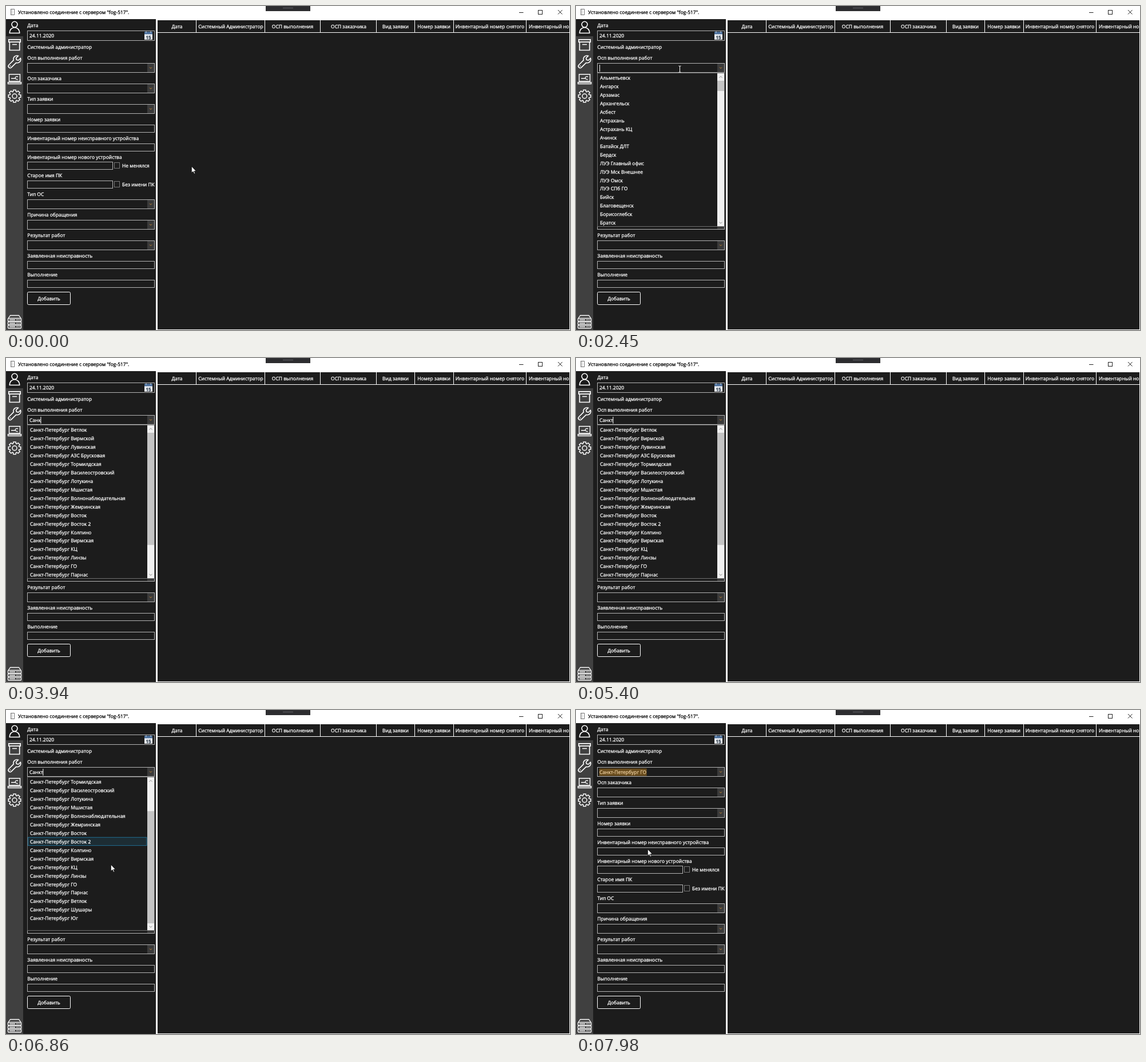
Write an HTML page that moves like this. It is 986x568 px and loops after 8000 ms.

```html
<!DOCTYPE html>
<html lang="ru">
<head>
<meta charset="utf-8">
<title>Заявки</title>
<style>
html, body { margin: 0; width: 100%; height: 100%; overflow: hidden; background: #fff; }
svg { display: block; }
text {
  font-family: "Open Sans", "Noto Sans", sans-serif; color: #fff; fill: currentColor;
  stroke: currentColor; stroke-width: .28; white-space: pre; text-rendering: geometricPrecision;
}
</style>
</head>
<body>
<svg id="stage" width="986" height="568" viewBox="0 0 986 568"></svg>
<script>
const LOOP = 8000, BG = '#1c1c1c', LINE = '#b4b4b4';
const ROW = 14.95, LIST_TOP = 118.4, ROWS = 18, LAG = 65;
const TRACK_TOP = 131, TRACK = 243;

// One font size for the whole window, chosen from the longest label.
const ctx = document.createElement('canvas').getContext('2d');
ctx.font = '100px "Open Sans", "Noto Sans", sans-serif';
const measure = s => ctx.measureText(s).width / 100;
const SIZE = 195 / measure('Инвентарный номер неисправного устройства');

const rect = (x, y, w, h, fill, extra = '') =>
  `<rect x="${x}" y="${y}" width="${w}" height="${h}" fill="${fill}" ${extra}/>`;
const frame = (x, y, w, h, color = LINE, extra = '') =>
  rect(x + .5, y + .5, w - 1, h - 1, 'none', `stroke="${color}" ${extra}`);
const path = (d, color, width = 1, fill = 'none') =>
  `<path d="${d}" fill="${fill}" stroke="${color}" stroke-width="${width}"/>`;
const text = (x, mid, s, extra = '') =>
  `<text x="${x}" y="${mid + 3.1}" font-size="${SIZE}" ${extra}>${s}</text>`;
const centered = (x, mid, s) => text(x, mid, s, 'text-anchor="middle"');

function titleBar() {
  return rect(0, 0, 986, 23, '#fff') +
    frame(8, 5, 7, 11, '#777') + path('M10.5 6v9', '#aaa') +
    text(21, 11, 'Установлено соединение с сервером "fog-517".', 'style="color:#000"') +
    rect(454, 0, 78, 9, '#2d2d30') +
    path('M484 3.5h18', '#55555a', 1.5) +
    path('M897 11.5h7.5', '#222') + frame(930, 7, 8, 8, '#222') +
    path('M965 7l7.5 7.5M972.5 7l-7.5 7.5', '#222');
}

function gear(cx, cy) {
  let d = '';
  for (let i = 0; i < 8; i++) {
    [[-.32, 8.3], [-.19, 11], [.19, 11], [.32, 8.3]].forEach(([da, r]) => {
      const a = i * Math.PI / 4 + da;
      d += (d ? 'L' : 'M') + (cx + r * Math.sin(a)).toFixed(2) + ' ' + (cy - r * Math.cos(a)).toFixed(2);
    });
  }
  return path(d + 'z', '#fff', 1.5) +
    `<circle cx="${cx}" cy="${cy}" r="4" fill="none" stroke="#fff" stroke-width="1.5"/>`;
}

function server() {
  let s = path('M4 547.5l3.5-5h15l3.5 5', '#fff', 1.3);
  for (let i = 0; i < 3; i++) {
    const y = 547 + i * 6;
    s += rect(3.5, y + .5, 23, 5.5, 'none', 'rx="1" stroke="#fff" stroke-width="1.3"') +
      path(`M6 ${y + 3.3}h10`, '#fff', 1.6) +
      `<path d="M18 ${y + 3.3}h7" stroke="#fff" stroke-width="1.4" stroke-dasharray="1.5 1"/>`;
  }
  return s;
}

function sidebar() {
  return rect(0, 23, 30, 545, '#404040') + rect(0, 23, 30, 30, BG) +
    '<circle cx="15" cy="32.3" r="5" fill="none" stroke="#fff" stroke-width="1.6"/>' +
    path('M6.3 47.5c0-13 17.4-13 17.4 0z', '#fff', 1.6) +
    path('M4.8 58.8h20.4v4.4H4.8zM6.3 63.2v14.3h17.4V63.2M11 67.5h8', '#fff', 1.7) +
    path('M25.4 91.6l-3.7 3.6-3.3-.8-.8-3.2 3.8-3.8c-5-1.6-9.6 2.4-8.2 7.5L5 103.2c-2.9 3 1.5 7.4 4.5 4.4l8.3-8.1c5.2 1.4 9.2-3 7.6-7.9z', '#fff', 1.6) +
    '<circle cx="7.5" cy="105.2" r=".9" fill="#fff"/>' +
    path('M5.5 119.7h19v12.3h-19zM3.5 133.8h23v2.7h-23z', '#fff', 1.4) +
    path('M9 127h7M21 124c-4-1-5.5 1-4.500 3 1 2 3.500 2 4.500 1.500', '#fff', 1.3) +
    gear(15, 158) + server();
}

const combo = y => frame(37, y, 223, 17) + rect(247, y + 1, 12, 15, '#3a3a3a') +
  path(`M251 ${y + 7.4}l2 2 2-2`, '#c98a35');
const box = (y, w = 223, id = '') => frame(37, y, w, 14, LINE, id && `id="${id}"`);
const check = (y, s) => frame(189, y, 10, 11, '#777') + text(203, y + 5.5, s);

function calendar() {
  return rect(242, 45, 14, 14, '#e9edf3') + rect(242, 45, 14, 4.5, '#4b6f9b') +
    path('M245 44.5v2.5M253 44.5v2.5', '#dce4ee') +
    '<text x="249" y="57.5" font-size="8" font-weight="700" text-anchor="middle" style="color:#35424f">15</text>';
}

function form() {
  const labels = [[34, 'Дата'], [72, 'Системный администратор'], [91, 'Осп выполнения работ'],
    [127, 'Осп заказчика'], [163, 'Тип заявки'], [199, 'Номер заявки'],
    [232, 'Инвентарный номер неисправного устройства'], [264.5, 'Инвентарный номер нового устройства'],
    [297, 'Старое имя ПК'], [330, 'Тип ОС'], [366, 'Причина обращения'], [402, 'Результат работ'],
    [438, 'Заявленная неисправность'], [471, 'Выполнение']];
  return rect(30, 23, 232, 545, BG) +
    labels.map(([y, s]) => text(37.3, y, s)).join('') +
    frame(37, 43, 223, 18) + text(41, 51.5, '24.11.2020') + calendar() +
    [100, 136, 172, 339, 375, 411].map(combo).join('') +
    [208, 241, 447, 480].map(y => box(y)).join('') +
    box(273, 150) + box(306, 150, 'oldName') +
    check(274, 'Не менялся') + check(307, 'Без имени ПК') +
    frame(37, 501, 76, 23, '#fff', 'rx="2"') + centered(75, 513, 'Добавить');
}

function table() {
  const heads = [[299, 'Дата'], [393, 'Системный Администратор'], [501, 'ОСП выполнения'],
    [599, 'ОСП заказчика'], [681, 'Вид заявки'], [748, 'Номер заявки'], [846, 'Инвентарный номер снятого']];
  return rect(265, 25, 720, 542, BG) + rect(265, 46, 720, 1, '#fff') +
    [332, 452, 549, 647, 714, 782, 909].map(x => rect(x, 25, 1, 21, '#fff')).join('') +
    heads.map(([x, s]) => centered(x, 36, s)).join('') +
    '<clipPath id="edge"><rect x="910" y="25" width="75" height="21"/></clipPath>' +
    text(914, 36, 'Инвентарный номер нового', 'clip-path="url(#edge)"');
}

function popup() {
  let rows = '';
  for (let i = 0; i < ROWS; i++) rows += text(42, 126 + i * ROW, '', 'class="row"');
  return '<g id="popup">' + rect(259.5, 121, 3.5, 269, '#000', 'opacity=".06"') +
    rect(37.5, 117.5, 222, 269, BG, 'stroke="#707070"') +
    rect(38.5, 0, 207.5, ROW - .6, '#26a0da', 'id="hover" fill-opacity=".13" stroke="#26a0da" stroke-opacity=".6"') +
    rows + rect(247, 118, 12, 268, '#f0f0f0') +
    path('M250.5 125.7l2.5-2.5 2.5 2.5M250.5 378.7l2.5 2.5 2.5-2.5', '#8a8a8a') +
    rect(247, TRACK_TOP, 12, 18, '#c4c4c4', 'id="thumb"') + '</g>';
}

const stage = document.getElementById('stage');
stage.innerHTML = rect(0, 0, 986, 568, '#fff') + titleBar() + sidebar() + form() + table() +
  text(41, 109, '', 'id="entry"') +
  rect(40.5, 102.5, 10, 13, '#c8871f', 'id="mark" opacity=".45"') +
  rect(41, 103, 1, 12, '#fff', 'id="caret"') + popup() +
  `<g id="arrow">${path('M0 0V11.5L2.7 9l1.9 4.2 1.7-.7L4.5 8.4H8z', '#000', .7, '#fff')}</g>` +
  `<g id="beam">${path('M-2 -5.5h1.5l.5.5.5-.5H2M0-5V5M-2 5.5h1.5L0 5l.5.5H2', '#fff')}</g>`;
const el = id => document.getElementById(id);
const rowEls = [...document.querySelectorAll('.row')];

const streets = ['Ветлок', 'Вирмской', 'Лувинская', 'АЗС Брусковая', 'Тормилдская', 'Василеостровский',
  'Лотукина', 'Мшистая', 'Волнонаблюдательная', 'Жемринская', 'Восток', 'Восток 2', 'Колпино',
  'Вирмская', 'КЦ', 'Линзы', 'ГО', 'Парнас', 'Ветлок', 'Шушары', 'Юг'];
const cities = ['Альметьевск', 'Ангарск', 'Арзамас', 'Архангельск', 'Асбест', 'Астрахань', 'Астрахань КЦ',
  'Ачинск', 'Батайск ДЛТ', 'Бердск', 'ЛУЭ Главный офис', 'ЛУЭ Мск Внешнее', 'ЛУЭ Омск', 'ЛУЭ СПб ГО',
  'Бийск', 'Благовещенск', 'Борисоглебск', 'Братск', 'Салават', 'Самара',
  ...streets.map(s => 'Санкт-Петербург ' + s), 'Саранск', 'Саратов', 'Смоленск', 'Сочи', 'Сургут'];

const typed = [[3340, 'С'], [3460, 'Са'], [3610, 'Сан'], [3910, 'Санк'], [4280, 'Санкт'], [7610, 'Санкт-Петербург ГО']];
const blinks = [1950, 2480, 3010, 4870, 5400, 5870, 6420, 6890, 7360, 7610];
const scrolls = [[5990, 3], [6020, 4]];
const track = [[430, 324, 281], [520, 331, 270], [700, 282, 192], [900, 202, 127], [1060, 181, 111],
  [5400, 181, 110], [5690, 191, 190], [6730, 191, 190], [6860, 183, 271], [7000, 178, 300],
  [7110, 178, 308], [7880, 178, 308], [7980, 125, 244]];

const latest = (list, t, start) => list.reduce((v, [at, next]) => t >= at ? next : v, start);

function pointer(t) {
  const i = track.findIndex(k => k[0] > t);
  if (i === 0) return track[0].slice(1);
  if (i < 0) return track[track.length - 1].slice(1);
  const a = track[i - 1], b = track[i], k = (t - a[0]) / (b[0] - a[0]);
  return [a[1] + (b[1] - a[1]) * k, a[2] + (b[2] - a[2]) * k];
}

function popupAlpha(t) {
  if (t < 1930 || t >= 7660) return 0;
  if (t < 1950) return .5;
  return t < 7610 ? 1 : t < 7635 ? .7 : .35;
}

const show = (node, on) => node.setAttribute('display', on ? 'inline' : 'none');

function drawList(t) {
  const alpha = popupAlpha(t);
  show(el('popup'), alpha > 0);
  if (!alpha) return;
  el('popup').setAttribute('opacity', alpha);
  const query = latest(typed.slice(0, 5), t, '');
  const items = cities.filter(c => c.startsWith(query));
  const top = latest(scrolls, t, 0);
  rowEls.forEach((r, i) => r.textContent = items[top + i] || '');

  const len = query ? Math.min(TRACK, TRACK * 17 / items.length) : 18;
  const y = TRACK_TOP + (top ? top / (items.length - 17) * (TRACK - len) : 0);
  el('thumb').setAttribute('y', y);
  el('thumb').setAttribute('height', len);

  // The highlight trails the pointer and stays on its item while the list scrolls.
  const under = Math.floor((pointer(t - LAG)[1] - LIST_TOP) / ROW);
  const row = under + (t < 6110 ? 0 : 4) - top;
  show(el('hover'), t >= 5430 && under >= 0 && row >= 0);
  el('hover').setAttribute('y', LIST_TOP + row * ROW + .2);
}

function render(t) {
  const entry = latest(typed, t, ''), width = measure(entry) * SIZE, done = t >= 7610;
  el('entry').textContent = entry;
  show(el('mark'), done);
  el('mark').setAttribute('width', width + 1);
  show(el('caret'), blinks.filter(b => b <= t).length % 2 === 1);
  el('caret').setAttribute('x', entry ? 41 + width - .4 : 41);
  drawList(t);
  el('oldName').setAttribute('stroke', t >= 7660 && t < 7900 ? '#7eb4ea' : LINE);

  const [x, y] = pointer(t);
  const hidden = t >= 3320 && t < 5430;
  const beam = t >= 1560 && t < 5690 && y < 118;
  show(el('beam'), beam && !hidden);
  show(el('arrow'), !beam && !hidden);
  el('beam').setAttribute('transform', `translate(${x + .5} ${y})`);
  el('arrow').setAttribute('transform', `translate(${x + .4} ${y})`);
}

let start;
function tick(now) {
  start ??= now;
  render((now - start) % LOOP);
  requestAnimationFrame(tick);
}
render(0);
requestAnimationFrame(tick);
</script>
</body>
</html>
```
